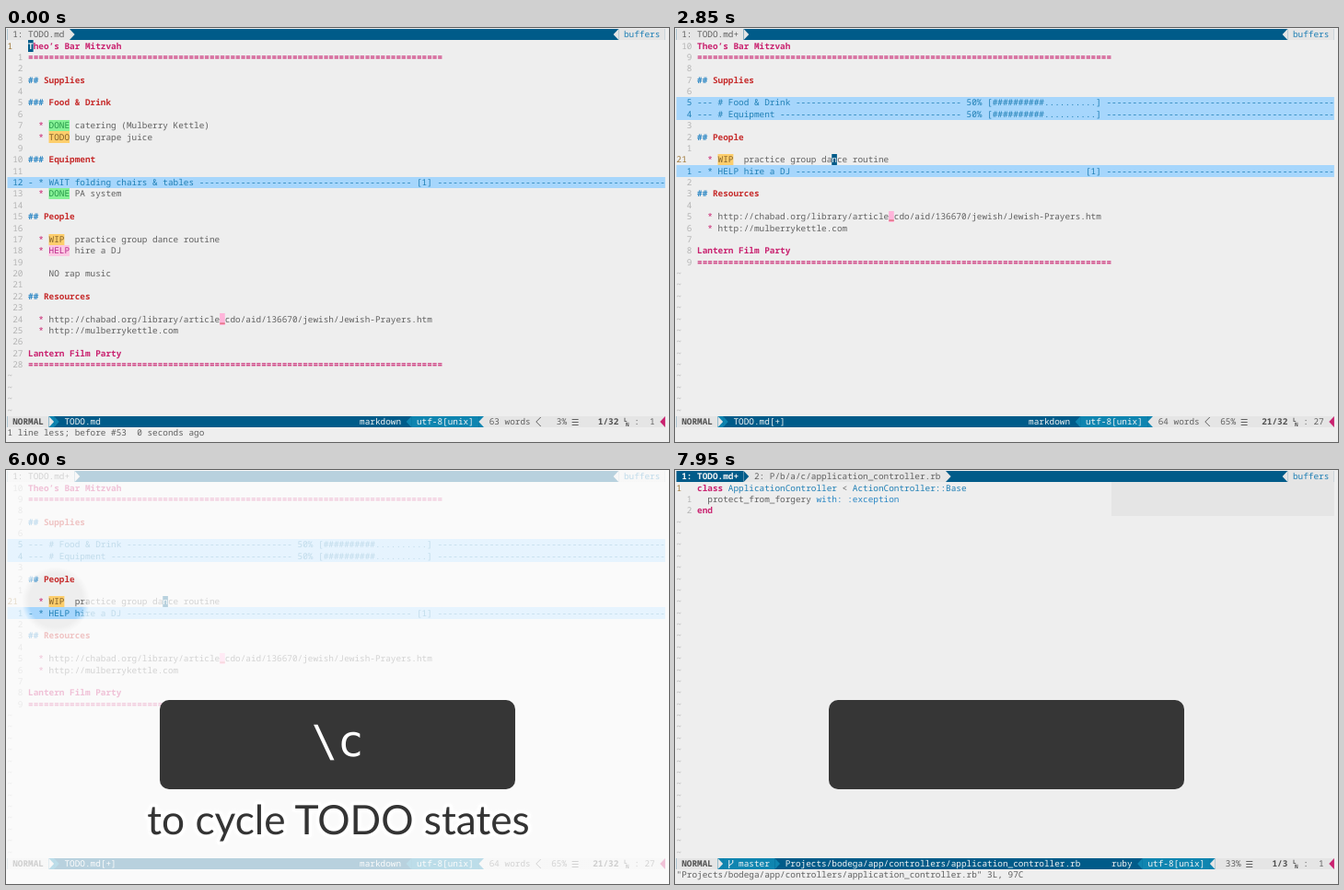
Animation of 720 by 450 pixels, one loop 8 s. Source, as an HTML page with a canvas:

```html
<!DOCTYPE html>
<html lang="en">
<head>
<meta charset="utf-8">
<title>Outline editing in a terminal</title>
<style>
  html, body { margin: 0; height: 100%; overflow: hidden; background: #eee; }
  canvas { display: block; width: 720px; height: 450px; }
</style>
</head>
<body>
<canvas id="stage" width="720" height="450"></canvas>
<script>
const ctx = document.getElementById('stage').getContext('2d');
const LOOP = 8000, CELL = 5.625, ROW = 12.375, COLS = 127, GUTTER = 4;
const STATUS_ROW = 34, MESSAGE_ROW = 35;
const MONO = '"Noto Sans Mono", "DejaVu Sans Mono", monospace';
const C = {
  bg: '#eeeeee', light: '#e5e5e5', text: '#606060', faint: '#b4b4b4', current: '#a07a3c',
  navy: '#005b89', teal: '#0f85b0', pink: '#c9216f', red: '#c62b2b', blue: '#2a86c4',
  fold: '#a6d6fc', foldText: '#1f7fb5', white: '#f4f4f4'
};
// keyword -> [text colour, background]
const MARKS = {
  DONE: ['#27984a', '#86f296'], TODO: ['#80602a', '#fdce6c'], WIP: ['#80602a', '#fdce6c'],
  WAIT: ['#1f7fb5', '#a6d6fc'], HELP: ['#b8288a', '#fcc6e2'], _: [C.red, '#ffb4da'], '  *': [C.pink]
};
const RULE = '='.repeat(80);

const documentLines = state => [
  'Theo’s Bar Mitzvah', RULE, '', '## Supplies', '',
  '### Food & Drink', '',
  '  * DONE catering (Mulberry Kettle)', '  * TODO buy grape juice', '',
  '### Equipment', '',
  '  * WAIT folding chairs & tables', '', '    40 chairs and 5 tables', '',
  '  * DONE PA system', '',
  '## People', '',
  `  * ${state.padEnd(4)} practice group dance routine`,
  '  * HELP hire a DJ', '', '    NO rap music', '',
  '## Resources', '',
  '  * http://chabad.org/library/article_cdo/aid/136670/jewish/Jewish-Prayers.htm',
  '  * http://mulberrykettle.com', '',
  'Lantern Film Party', RULE
];

// first line -> length, heading and summary of a fold
const PROGRESS = `50% [${'#'.repeat(10)}${'.'.repeat(10)}]`;
const FOLDS = {
  6: [5, '--- # Food & Drink', PROGRESS],
  11: [7, '--- # Equipment', PROGRESS],
  13: [4, '- * WAIT folding chairs & tables', '[1]'],
  22: [3, '- * HELP hire a DJ', '[1]']
};

const PATH = 'Projects/bodega/app/controllers/application_controller.rb';
const COMMAND = ':e ' + PATH;
const TYPED = [1, 2, 3, 4, 5, 6, 12, 13, 14, 19, 20, 21, 23, 24, 25, 35, 36, 37, 60];
const CYCLE = ['WAIT', 'HELP', 'DONE', 'TODO', 'WIP'];

const STEPS = [
  [0, { line: 1, col: 1, closed: [13], state: 'WIP', words: 63, key: '',
        message: '1 line less; before #53  0 seconds ago' }],
  [350, { closed: [], caption: ['fold headings & list items', 46.5] }],
  [700, { closed: [13] }],
  [1050, { closed: [6, 11, 22] }],
  [1400, { line: 22, col: 5 }],
  [1750, { closed: [6, 11] }],
  [2100, { line: 23, col: 1, caption: null }],
  [2150, { line: 24, col: 5 }],
  [2250, { line: 23, col: 1 }],
  [2300, { line: 22, col: 5 }],
  [2350, { closed: [6, 11, 22] }],
  [2400, { line: 21 }],
  [2450, { col: 10 }],
  [2500, { col: 19 }],
  [2550, { col: 25 }],
  [2600, { col: 26 }],
  [2650, { col: 27 }],
  [2700, { edited: true, words: 64, message: '' }],
  [3200, { box: true, caption: ['to cycle TODO states', 44.2], spot: [54, 142, 37, 37, 0.72] }],
  ...CYCLE.flatMap((state, i) => [
    [3400 + 600 * i, { key: '\\' }],
    [3600 + 600 * i, { key: '\\c', state }],
    [3800 + 600 * i, { key: '' }]
  ]),
  [6400, { box: false, caption: ['view progress summary', 46.5], spot: [389, 88, 103, 24, 0.62] }],
  ...TYPED.map((typed, i) => [6600 + 50 * i, { typed }]),
  [7550, { typed: 0, ruby: true, caption: null, spot: null, message: `"${PATH}" 3L, 97C` }],
  [7750, { box: true }]
];

const colX = col => 1.5 + CELL * col;
const rowY = row => Math.round(0.8 + ROW * row);

function fill(row, col, count, color) {
  ctx.fillStyle = color;
  ctx.fillRect(colX(col), rowY(row), CELL * count, rowY(row + 1) - rowY(row));
}

function put(row, col, text, color = C.text, bold = false, bg) {
  if (bg) fill(row, col, text.length, bg);
  ctx.font = `${bold ? 'bold ' : ''}9.375px ${MONO}`;
  ctx.fillStyle = color;
  [...text].forEach((ch, i) => {
    if (ch !== ' ') ctx.fillText(ch, colX(col + i), 10.2 + ROW * row);
  });
  return col + text.length;
}

function putRuns(row, col, runs) {
  for (const run of runs) col = put(row, col, ...run);
}

// Powerline wedge: dir 1 points right, -1 points left
function wedge(row, col, dir, color, bg) {
  fill(row, col, 1, bg);
  const base = colX(dir > 0 ? col : col + 1), top = rowY(row), bottom = rowY(row + 1);
  ctx.fillStyle = color;
  ctx.beginPath();
  ctx.moveTo(base, top);
  ctx.lineTo(base + dir * CELL, (top + bottom) / 2);
  ctx.lineTo(base, bottom);
  ctx.fill();
}

function strokePath(points, color, width = 1) {
  ctx.strokeStyle = color;
  ctx.lineWidth = width;
  ctx.beginPath();
  points.forEach(([x, y], i) => i ? ctx.lineTo(x, y) : ctx.moveTo(x, y));
  ctx.stroke();
}

function drawCursor(row, col, ch = ' ', bold = false) {
  fill(row, col, 1, C.navy);
  put(row, col, ch, C.white, bold);
}

function drawTabs(s) {
  fill(0, 0, COLS, C.navy);
  const name = '1: TODO.md' + (s.edited ? '+' : '');
  if (s.ruby) {
    put(0, 1, name, C.white, true);
    fill(0, 13, 39, C.light);
    wedge(0, 13, 1, C.navy, C.light);
    put(0, 15, '2: P/b/a/c/application_controller.rb');
    wedge(0, 52, 1, C.light, C.navy);
  } else {
    fill(0, 0, name.length + 2, C.light);
    put(0, 1, name);
    wedge(0, name.length + 2, 1, C.light, C.navy);
  }
  wedge(0, 117, -1, C.light, C.navy);
  fill(0, 118, 9, C.light);
  put(0, 119, 'buffers', C.foldText);
}

function drawStatus(s) {
  const r = STATUS_ROW, y = rowY(r);
  const total = s.ruby ? 3 : 32, line = s.ruby ? 1 : s.line, col = s.ruby ? 1 : s.col;
  const type = s.ruby ? 'ruby' : 'markdown', enc = s.ruby ? 91 : 79;
  const shift = s.ruby ? 1 : 0;
  fill(r, 0, COLS, C.navy);
  fill(r, 0, 8, C.light);
  put(r, 1, 'NORMAL', '#505050', true);
  wedge(r, 8, 1, C.light, C.teal);
  if (s.ruby) {
    fill(r, 9, 10, C.teal);
    const x = colX(10);
    strokePath([[x + 1, y + 2], [x + 1, y + 11]], C.white);
    strokePath([[x + 5, y + 2], [x + 5, y + 5], [x + 1, y + 8]], C.white);
    put(r, 12, 'master', C.white);
    wedge(r, 19, 1, C.teal, C.navy);
    put(r, 21, PATH, C.white);
  } else {
    wedge(r, 9, 1, C.teal, C.navy);
    put(r, 11, 'TODO.md' + (s.edited ? '[+]' : ''), C.white);
  }
  put(r, enc - 3 - type.length, type, C.white);
  wedge(r, enc - 2, -1, C.teal, C.navy);
  fill(r, enc - 1, 13, C.teal);
  put(r, enc, 'utf-8[unix]', C.white);
  wedge(r, enc + 12, -1, C.light, C.teal);
  fill(r, enc + 13, COLS - enc - 13, C.light);
  if (!s.ruby) {
    put(r, 93, s.words + ' words');
    const x = colX(102);
    strokePath([[x + 5.5, y + 1], [x + 0.5, y + 6], [x + 5.5, y + 11]], C.text);
  }
  put(r, 104 + shift, (Math.floor(100 * line / total) + '%').padStart(4));
  const bars = colX(109 + shift);
  for (const dy of [3.5, 6.5, 9.5]) strokePath([[bars, y + dy], [bars + 7, y + dy]], C.text);
  put(r, 113, `${line}/${total}`.padStart(5), '#505050', true);
  ctx.font = `bold 6px ${MONO}`;
  ctx.fillStyle = '#505050';
  ctx.fillText('L', colX(119), y + 6);
  ctx.fillText('N', colX(119) + 2, y + 11);
  put(r, 121, ':');
  put(r, 123, String(col).padStart(2));
  wedge(r, 126, -1, C.pink, C.light);
}

function styleLine(text, isTitle) {
  if (isTitle || text === RULE) return [[text, C.pink, true]];
  if (text[0] === '#') {
    const hashes = text.match(/^#+/)[0];
    return [[hashes, C.blue, true], [text.slice(hashes.length), C.red, true]];
  }
  return text.split(/(^  \*|DONE|TODO|WIP|WAIT|HELP|_)/).map(part => {
    const [color, bg] = MARKS[part] || [C.text];
    return [part, color, false, bg];
  });
}

function foldText([, head, tail]) {
  const left = (head + ' ').padEnd(77 - tail.length, '-');
  return `${left} ${tail} `.padEnd(COLS - GUTTER, '-');
}

function visibleRows(s) {
  const lines = documentLines(s.state), rows = [];
  for (let n = 1; n <= lines.length;) {
    const fold = s.closed.includes(n) && FOLDS[n];
    rows.push({ n, fold, text: fold ? foldText(fold) : lines[n - 1], title: n === 1 || n === 31 });
    n += fold ? fold[0] : 1;
  }
  return rows;
}

function drawNumber(row, number, distance, color = C.faint) {
  if (distance) put(row, 0, String(distance).padStart(3), color);
  else put(row, 0, String(number), C.current);
}

function drawTildes(row) {
  for (; row < STATUS_ROW; row++) put(row, 0, '~', C.faint);
}

function drawDocument(s) {
  const rows = visibleRows(s);
  const here = rows.findIndex(r => r.n === s.line);
  rows.forEach((r, i) => {
    const y = i + 1;
    if (r.fold) fill(y, 0, COLS, C.fold);
    drawNumber(y, r.n, Math.abs(i - here), r.fold ? C.foldText : C.faint);
    putRuns(y, GUTTER, r.fold ? [[r.text, C.foldText]] : styleLine(r.text, r.title));
  });
  drawTildes(rows.length + 1);
  if (!s.typed) {
    const r = rows[here], col = r.fold ? 0 : s.col - 1;
    drawCursor(here + 1, GUTTER + col, r.text[col], r.title);
  }
}

function drawRuby() {
  for (const row of [1, 2, 3]) {
    fill(row, 84, 43, C.light);
    drawNumber(row, 1, row - 1);
  }
  putRuns(1, GUTTER, [['class', C.pink, true], [' ApplicationController', C.foldText],
    [' < '], ['ActionController::Base', C.foldText]]);
  putRuns(2, GUTTER, [['  protect_from_forgery '], ['with: ', C.blue], [':exception', C.blue]]);
  put(3, GUTTER, 'end', C.pink, true);
  drawTildes(4);
}

function drawSpot([x, y, rx, ry, alpha]) {
  ctx.save();
  ctx.translate(x, y);
  ctx.scale(rx, ry);
  const veil = ctx.createRadialGradient(0, 0, 0.78, 0, 0, 1);
  veil.addColorStop(0, 'rgba(255,255,255,0)');
  veil.addColorStop(1, `rgba(255,255,255,${alpha})`);
  ctx.fillStyle = veil;
  ctx.fillRect(-x / rx, -y / ry, 720 / rx, 450 / ry);
  ctx.restore();
}

function drawBox(key) {
  ctx.fillStyle = '#363636';
  ctx.beginPath();
  ctx.roundRect(167, 250, 386, 97, 10);
  ctx.fill();
  ctx.font = '47px "DejaVu Sans Mono", monospace';
  ctx.fillStyle = '#fff';
  ctx.textAlign = 'center';
  ctx.fillText(key, 360, 311);
}

function drawCaption([text, size]) {
  ctx.font = `${size}px Lato, "Open Sans", sans-serif`;
  ctx.textAlign = 'center';
  ctx.lineJoin = 'round';
  ctx.lineWidth = 7;
  ctx.strokeStyle = ctx.shadowColor = '#fff';
  ctx.shadowBlur = 4;
  ctx.strokeText(text, 361, 396);
  ctx.shadowBlur = 0;
  ctx.fillStyle = '#343434';
  ctx.fillText(text, 361, 396);
}

function draw(s) {
  ctx.textRendering = 'geometricPrecision';
  ctx.textAlign = 'left';
  ctx.fillStyle = C.bg;
  ctx.fillRect(0, 0, 720, 450);
  drawTabs(s);
  if (s.ruby) drawRuby(); else drawDocument(s);
  drawStatus(s);
  put(MESSAGE_ROW, 0, s.typed ? COMMAND.slice(0, s.typed) : s.message);
  if (s.spot) drawSpot(s.spot);
  if (s.typed) drawCursor(MESSAGE_ROW, s.typed);
  if (s.box) drawBox(s.key);
  if (s.caption) drawCaption(s.caption);
}

const start = performance.now();
let shown = 0;
function tick() {
  const time = Math.max(0, performance.now() - start) % LOOP;
  const past = STEPS.filter(([at]) => at <= time);
  if (past.length !== shown) {
    shown = past.length;
    draw(Object.assign({}, ...past.map(([, change]) => change)));
  }
  requestAnimationFrame(tick);
}
tick();
</script>
</body>
</html>
```
